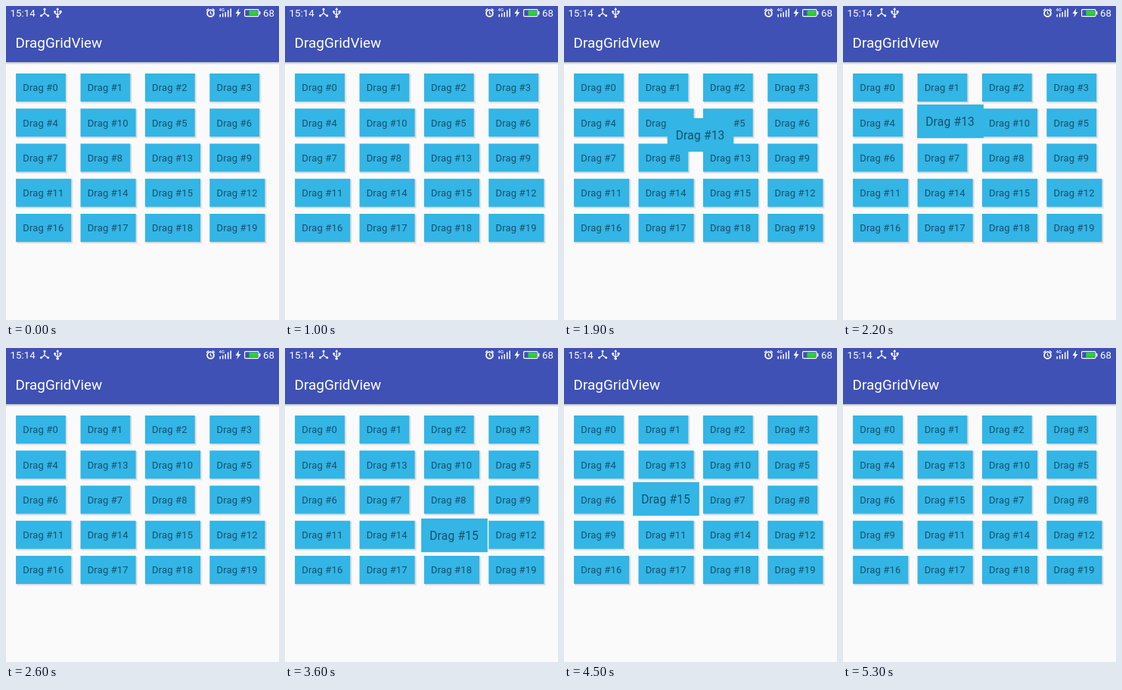
Recreate the animation shown at these times as an HTML page. Size 361x414 px, loop 6.8 s.

```html
<!DOCTYPE html>
<html lang="en">
<head>
<meta charset="utf-8">
<title>DragGridView</title>
<style>
  html, body { margin: 0; width: 100%; height: 100%; overflow: hidden; background: #fafafa; }
  svg { display: block; font-family: Roboto, sans-serif; }
  .tile text { font-size: 13px; letter-spacing: .15px; fill: #17516a; }
  .tile rect { fill: #33b5e5; }
  .tile .shade { fill: #000; opacity: .07; }
  #ghost .shade { display: none; }
  .status { fill: #fff; font-size: 13.3px; }
  .line { fill: none; stroke: #fff; stroke-width: 1.2; }
</style>
</head>
<body>
<svg width="361" height="414" viewBox="0 0 361 414">
  <defs>
    <linearGradient id="drop" x2="0" y2="1">
      <stop stop-color="#b9b9bd"/>
      <stop offset="1" stop-color="#fafafa"/>
    </linearGradient>
  </defs>
  <rect width="361" height="414" fill="#fafafa"/>
  <rect y="73.5" width="361" height="4" fill="url(#drop)"/>
  <rect width="361" height="74" fill="#3f51b5"/>
  <text x="12.6" y="54.5" font-size="18.9" fill="#fff">DragGridView</text>

  <text class="status" x="5.5" y="14">15:14</text>
  <text class="status" x="340" y="14">68</text>

  <!-- debug and cable icons -->
  <path class="line" d="M51 4V9.5L46.5 13M51 9.5L55.5 13"/>
  <g fill="#fff">
    <circle cx="51" cy="4.2" r="1.5"/>
    <circle cx="46.5" cy="12.8" r="1.5"/>
    <circle cx="55.7" cy="12.8" r="1.5"/>
    <path d="M66.2 5L68.2 2L70.2 5ZM70.6 6h3v3h-3z"/>
    <circle cx="64.6" cy="7.6" r="1.5"/>
    <circle cx="68.2" cy="14" r="1.8"/>
  </g>
  <path class="line" d="M68.2 4V14M64.6 8V9.5L68.2 11.8L72 9.8V8"/>

  <!-- alarm -->
  <circle cx="270.5" cy="9.5" r="4.4" class="line" style="stroke-width:1.8"/>
  <path class="line" d="M265 6L268 3.5M276 6L273 3.5M270.5 7V10L272.5 11"/>

  <!-- signal -->
  <text x="281.5" y="7" font-size="6" font-weight="500" fill="#fff">4G</text>
  <path class="line" style="stroke-width:1.5" d="M283.2 14.5V11M286.7 14.5V9.5M290.2 14.5V8M293.7 14.5V5.5M297.2 14.5V3.5"/>

  <!-- battery -->
  <path fill="#fff" d="M308.3 3L303.5 10H306.5L305.2 15L310.5 8H307.4Z"/>
  <rect class="line" x="315.6" y="4.6" width="18.4" height="9" rx="1.2"/>
  <rect x="334.8" y="7" width="1.6" height="4.4" fill="#fff"/>
  <rect x="321.5" y="6" width="11.2" height="6.4" fill="#2ad52a"/>

  <g id="grid"></g>
  <g id="ghost" class="tile"></g>
</svg>
<script>
const LOOP = 6800, STEP = 100, TILE_H = 37;
const grid = document.getElementById('grid');
const ghost = document.getElementById('ghost');

const startOrder = [0, 1, 2, 3, 4, 10, 5, 6, 7, 8, 13, 9, 11, 14, 15, 12, 16, 17, 18, 19];

// Centre of the lifted tile at each time; its slot changes at `swap`.
const drags = [
  { id: 13, slot: 5, swap: 2000, end: 2400, path: [
    [1200, 232, 207], [1400, 231, 206], [1700, 219, 195], [1800, 200, 183], [1900, 180.5, 170],
    [2000, 162, 160], [2100, 148, 154], [2200, 142, 152], [2300, 139, 151]] },
  { id: 15, slot: 9, swap: 4100, end: 4600, path: [
    [3600, 224, 247], [3900, 214, 241], [4000, 185, 224], [4100, 153.8, 207],
    [4200, 142, 202], [4300, 138, 200], [4400, 136, 199], [4500, 135, 199]] }
];

function moved(order, { id, slot }) {
  const next = order.filter(n => n !== id);
  next.splice(slot, 0, id);
  return next;
}

const tileWidth = id => id < 10 ? 65.8 : 73.1;

function tileMarkup(id) {
  const w = tileWidth(id);
  return `<rect class="shade" x="1" y="1" width="${w + 1.4}" height="${TILE_H + 1.4}"/>
    <rect class="shade" x=".5" y=".5" width="${w + .7}" height="${TILE_H + .9}"/>
    <rect width="${w}" height="${TILE_H}"/>
    <text x="9.2" y="23.3">Drag #${id}</text>`;
}

const tiles = {};
grid.innerHTML = startOrder.map(id => `<g class="tile" data-id="${id}">${tileMarkup(id)}</g>`).join('');
for (const el of grid.children) tiles[el.dataset.id] = el;

function place(order) {
  order.forEach((id, i) => {
    const x = 13.1 + 85.4 * (i % 4), y = 89 + 46.25 * Math.floor(i / 4);
    tiles[id].setAttribute('transform', `translate(${x} ${y})`);
  });
}

function lift(drag, t) {
  const [, x, y] = drag.path.filter(p => p[0] <= t).pop();
  const left = x - tileWidth(drag.id) * .6, top = y - TILE_H * .6;
  ghost.innerHTML = tileMarkup(drag.id);
  ghost.setAttribute('transform', `translate(${left} ${top}) scale(1.2)`);
}

let shown = -1;
function draw(now) {
  const t = Math.floor(now % LOOP / STEP) * STEP;
  if (t !== shown) {
    shown = t;
    place(drags.filter(d => t >= d.swap).reduce(moved, startOrder));
    const drag = drags.find(d => t >= d.path[0][0] && t < d.end);
    if (drag) lift(drag, t);
    else ghost.innerHTML = '';
  }
}

const began = performance.now();
function tick() {
  draw(performance.now() - began);
  requestAnimationFrame(tick);
}
tick();
</script>
</body>
</html>
```
